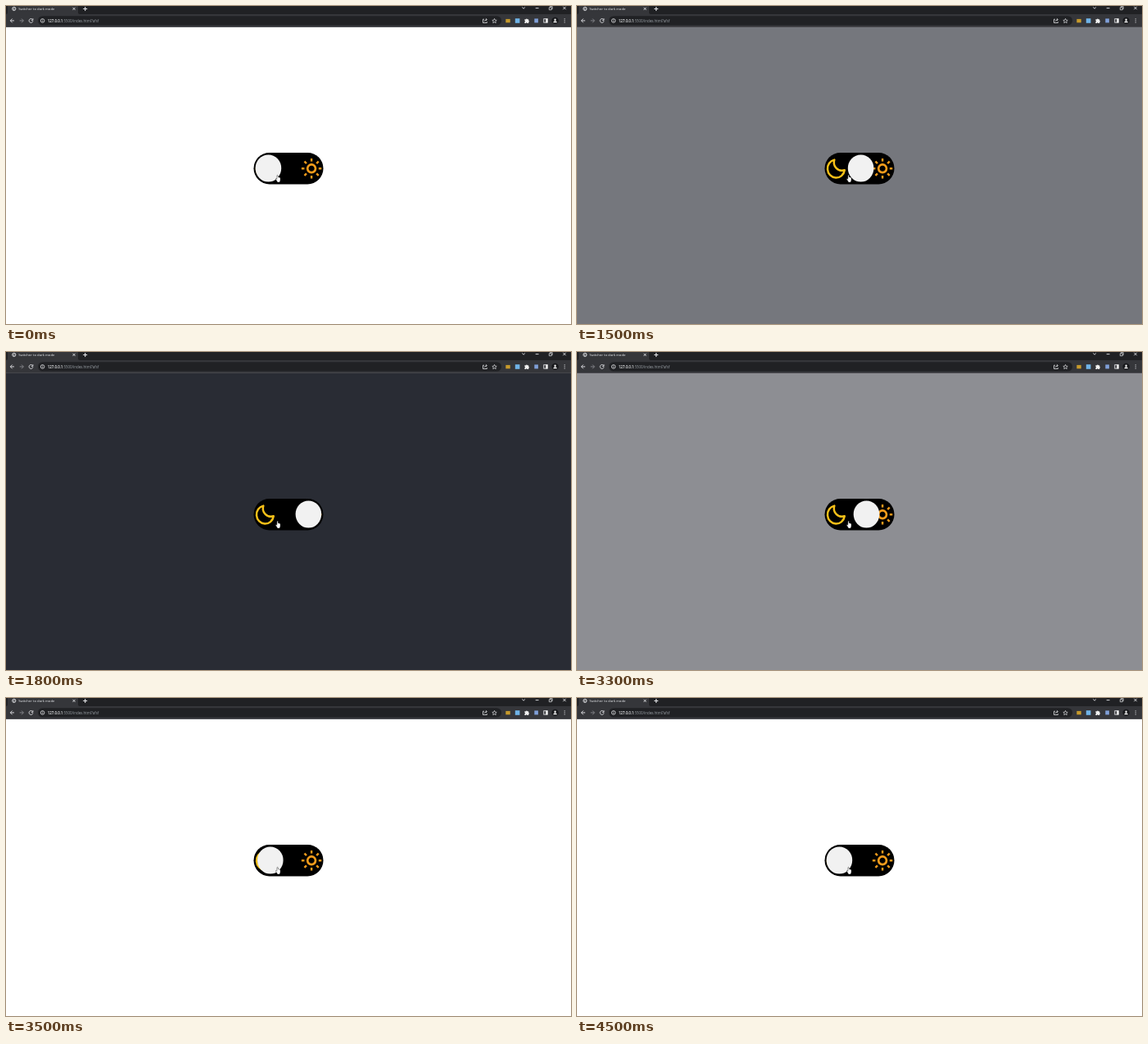
An HTML page that plays this animation: 690x388 px, repeating every 4900 ms.

```html
<!DOCTYPE html>
<html lang="en">
<head>
<meta charset="utf-8">
<title>Dark mode switch</title>
<style>
html, body { margin: 0; width: 100%; height: 100%; overflow: hidden; background: #fff; }
svg { display: block; width: 100vw; height: 100vh; }
text { font-family: "Open Sans", "Noto Sans", sans-serif; }
.line { fill: none; stroke: #e4e5e8; stroke-width: .9; }
</style>
</head>
<body>
<svg viewBox="0 0 690 388">
  <rect id="page" width="690" height="388" fill="#fff"/>

  <g id="browser">
    <rect width="690" height="11" fill="#202124"/>
    <path d="M0 10Q2 10 2 8V0H88V8Q88 10 91 10H690V25.8H0Z" fill="#35363a"/>
    <rect y="25.2" width="690" height=".8" fill="#4b4c50"/>
    <rect x="39" y="12.2" width="566" height="11.4" rx="5.7" fill="#202124"/>

    <g class="line">
      <circle cx="9.8" cy="3.4" r="2.1"/>
      <path d="M8 2.6l2 .8l-.5 2M10 1.4l1.7 1.5" stroke-width=".7"/>
      <path d="M81.5 1.9l3 3m0-3l-3 3"/>
      <path d="M94.2 3.5h5M96.7 1v5" stroke-width="1.1"/>
      <path d="M10 17.9H5.5M7.7 15.5L5.3 17.9L7.7 20.3"/>
      <path d="M16.7 17.9h4.5M19 15.5l2.4 2.4L19 20.3" stroke="#8a8b8f"/>
      <path d="M32.4 16.4A2.4 2.4 0 1 0 32.9 18.4M32.9 15.2V17.3H30.8"/>
      <circle cx="44.6" cy="17.9" r="2.3" stroke-width=".8"/>
      <path d="M44.6 17.6v1.6M44.6 16.4v.6" stroke-width=".8"/>
      <path d="M584 16.2h-1.5v4.3h4.8v-1.4M584.4 18.7q.2-2 2.6-2.1M585.9 15.2l1.5 1.4l-1.5 1.4" stroke-width=".8"/>
      <path d="M596.5 15.4l.8 1.8l1.9.2l-1.4 1.3l.4 1.9l-1.7-1l-1.7 1l.4-1.9l-1.4-1.3l1.9-.2Z" stroke-width=".7"/>
      <path d="M630.3 1.5l1.8 1.7l1.8-1.7"/>
      <path d="M646.7 2.6h3.8"/>
      <path d="M663.3 1.8h2.9v2.9h-2.9ZM664.3 1.6V.6h2.9v3h-.8" stroke-width=".7"/>
      <path d="M680.3 .8l3.4 3.4m0-3.4l-3.4 3.4"/>
      <rect x="656.8" y="15.7" width="4.4" height="4.4"/>
    </g>
    <rect x="659.2" y="15.5" width="2.2" height="4.8" fill="#f1f1f1"/>

    <rect x="610.3" y="15.9" width="5.4" height="4.4" fill="#c79a2b"/>
    <rect x="621.8" y="15.2" width="5.6" height="5.6" fill="#6fb3e8"/>
    <rect x="645.3" y="15.4" width="4.6" height="5" fill="#7f9fd8"/>
    <path d="M633.4 16.3h1.5a1 1 0 0 1 1.9 0h1.4v1.5a1 1 0 0 1 0 1.9v1.2h-1.5a1 1 0 0 0-1.8 0h-1.5v-1.5a1 1 0 0 0 0-1.7Z" fill="#f1f1f1"/>
    <circle cx="670.6" cy="17.9" r="4.2" fill="#17181b"/>
    <path d="M668.3 20.3q0-2 2.3-2t2.3 2Z" fill="#f1f1f1"/>
    <circle cx="670.6" cy="16.7" r="1.2" fill="#f1f1f1"/>
    <path d="M682.2 15.3v1m0 1.1v1m0 1.1v1" stroke="#e4e5e8"/>

    <text x="15.2" y="5" font-size="4.2" fill="#e8eaed">Switcher to dark mode</text>
    <text x="50.7" y="19.5" font-size="4.4" fill="#9aa0a6"><tspan fill="#f1f3f4" font-weight="600">127.0.0.1</tspan>:5500/index.html?afsf</text>
  </g>

  <rect x="302.5" y="179" width="85" height="38.4" rx="19.2"/>
  <path d="M314.3 187.6A10.5 11.1 0 1 0 326.8 200.3A10 10 0 0 1 314.3 187.6Z"
        fill="none" stroke="#f6c018" stroke-width="2.5" stroke-linejoin="round"/>
  <g id="sun" transform="translate(373.1 198.3)" fill="none" stroke="#f39c1b">
    <circle r="4.9" stroke-width="2.7"/>
  </g>
  <ellipse id="knob" cx="320.4" cy="198" rx="15.8" ry="16.5" fill="#f1f1f1"/>
  <path d="M331 206.6q.8-.7 1.2.2v2q.8-.4 1.1.2q.7-.3 1 .3q.7-.1.7.7v2.6q-.2 1-.7 1.6v.9h-2.9l-.3-1l-1.7-2.7q-.2-1 .8-.7l.6.6Z"
        fill="#fff" stroke="#222" stroke-width=".45"/>
</svg>
<script>
const LOOP = 4900, STEP = 100;
const LEFT = 320.4, RIGHT = 369.4;
const LIGHT = [255, 255, 255], DARK = [41, 44, 52];
const toDark = { start: 1388, knob: 360, page: 300 };
const toLight = { start: 3217, knob: 390, page: 300 };

const page = document.getElementById("page");
const knob = document.getElementById("knob");
const sun = document.getElementById("sun");

for (let angle = 0; angle < 360; angle += 45) {
  const ray = document.createElementNS("http://www.w3.org/2000/svg", "path");
  ray.setAttribute("d", "M8.7 0H12.2");
  ray.setAttribute("stroke-width", 2.4);
  ray.setAttribute("transform", `rotate(${angle})`);
  sun.append(ray);
}

const bezier = (s, a, b) => 3 * s * (1 - s) ** 2 * a + 3 * s * s * (1 - s) * b + s ** 3;

// cubic-bezier(.25, .1, .25, 1)
function ease(x) {
  if (x <= 0) return 0;
  if (x >= 1) return 1;
  let low = 0, high = 1;
  for (let i = 0; i < 24; i++) {
    const mid = (low + high) / 2;
    if (bezier(mid, .25, .25) < x) low = mid; else high = mid;
  }
  return bezier(low, .1, 1);
}

const progress = (t, part) =>
  ease((t - toDark.start) / toDark[part]) - ease((t - toLight.start) / toLight[part]);
const mix = (a, b, k) => a + (b - a) * k;

function draw(time) {
  const t = Math.floor((time % LOOP) / STEP) * STEP;
  const shade = progress(t, "page");
  knob.setAttribute("cx", mix(LEFT, RIGHT, progress(t, "knob")));
  page.setAttribute("fill", `rgb(${LIGHT.map((c, i) => Math.round(mix(c, DARK[i], shade)))})`);
}

const begin = performance.now();
function tick() {
  draw(performance.now() - begin);
  requestAnimationFrame(tick);
}
tick();
</script>
</body>
</html>
```
